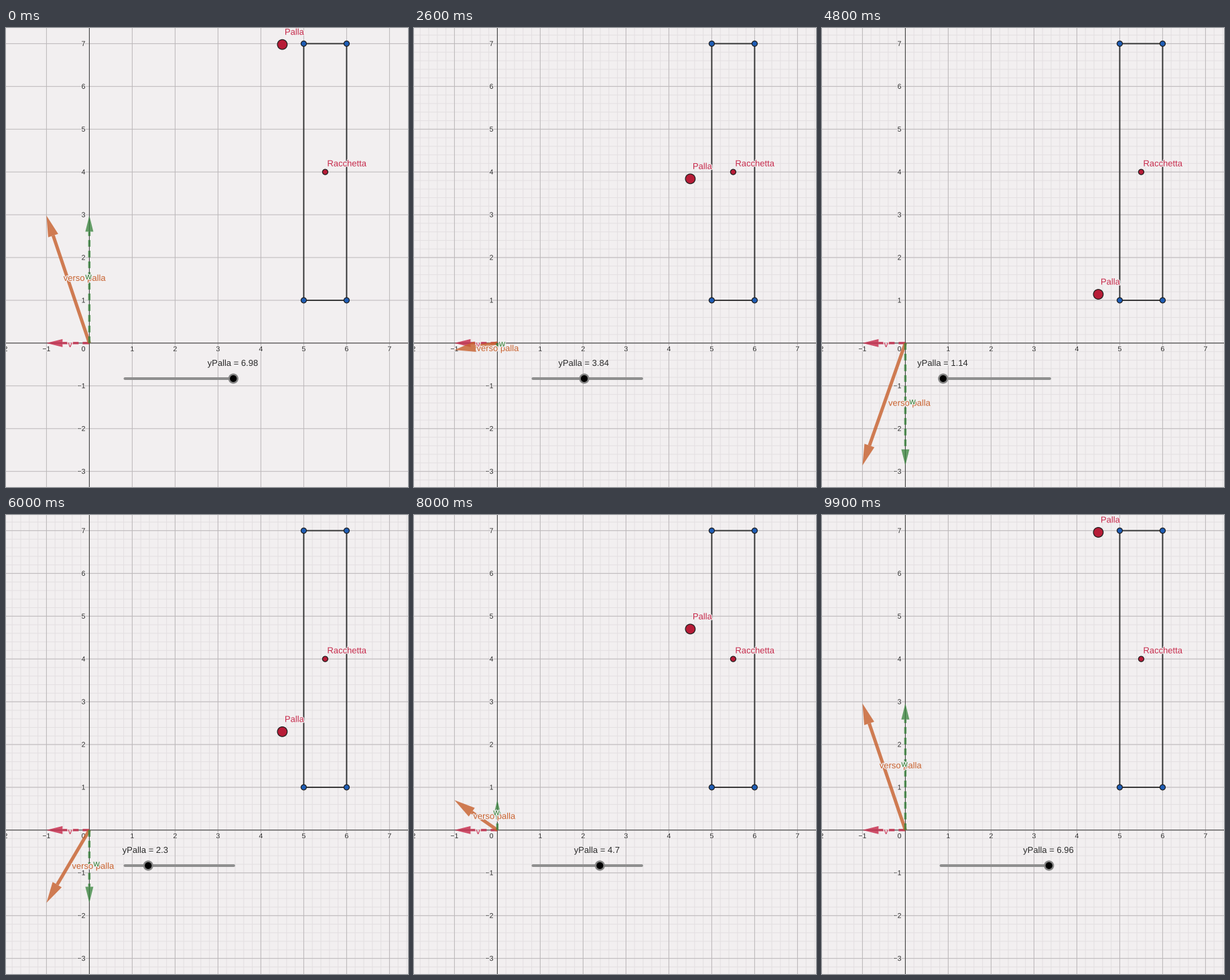
A matplotlib script that plays this animation: 600 by 686 pixels, repeating every 10000 ms.

```python
import numpy as np
import matplotlib.pyplot as plt
from matplotlib.animation import FuncAnimation
from matplotlib.patches import Circle, Polygon
from matplotlib.patheffects import withStroke

W, H, DPI = 600, 686, 100
FRAMES, STEP = 100, 100
X0, Y0, UX, UY = 123.9, 470.4, 64, 63.93
BG, INK = "#f2eff0", "#2a2a2a"
RED, GREEN, ORANGE = "#c62a4b", "#348239", "#c8622f"

plt.rcParams["font.family"] = "Liberation Sans"
plt.rcParams["path.snap"] = False


def pt(px):
    return px * 72 / DPI


def sx(x):
    return X0 + x * UX


def sy(y):
    return Y0 - y * UY


# Integer coordinates are pixel centres
fig = plt.figure(figsize=(W / DPI, H / DPI), dpi=DPI, facecolor=BG)
ax = fig.add_axes([0, 0, 1, 1])
ax.set_xlim(-0.5, W - 0.5)
ax.set_ylim(H - 0.5, -0.5)
ax.axis("off")


def line(xs, ys, color, width, z, **kw):
    kw.setdefault("solid_capstyle", "butt")
    return ax.plot(xs, ys, color=color, lw=pt(width), zorder=z, **kw)[0]


def label(x, y, s, color, z=10, size=13, ha="left", halo=2.5):
    fx = [withStroke(linewidth=pt(halo), foreground=BG)]
    return ax.text(x, y, s, color=color, fontsize=pt(size), ha=ha,
                   va="baseline", zorder=z, path_effects=fx)


def dot(x, y, r, color, edge="#1c1c1c", width=1.2, z=8):
    return ax.add_patch(Circle((x, y), r, fc=color, ec=edge,
                               lw=pt(width), zorder=z))


def grid(xs, ys, color, z):
    kw = dict(colors=color, lw=pt(1), zorder=z)
    return [ax.vlines([sx(x) for x in xs], -1, H, **kw),
            ax.hlines([sy(y) for y in ys], -1, W, **kw)]


class Vector:
    """Arrow from the origin with a label beside its middle."""

    def __init__(self, name, color, width, head, gap, z, alpha, dashed=False):
        self.head, self.gap = head, gap
        style = dict(linestyle=(0, (10 / width, 6 / width))) if dashed else {}
        self.shaft = line([], [], color, width, z, alpha=alpha,
                          dash_capstyle="butt", **style)
        self.tip = ax.add_patch(Polygon([(0, 0)] * 3, fc=color, lw=0,
                                        alpha=alpha, zorder=z))
        self.text = label(0, 0, name, color, z=z + 6)

    def set(self, x, y):
        start, end = np.array([sx(0), sy(0)]), np.array([sx(x), sy(y)])
        size = np.hypot(*(end - start))
        d = (end - start) / max(size, 1e-6)
        side = np.array([d[1], -d[0]])
        head = min(self.head, size)
        base = end - d * head
        self.shaft.set_data([start[0], base[0]], [start[1], base[1]])
        self.tip.set_xy([end, base + side * head / 4, base - side * head / 4])
        gap = self.gap * min(1, size / 25)
        self.text.set_position((start + end) / 2 + side * gap)


# Grid, axes and numbers
minor = grid(np.arange(-10, 40) / 5, np.arange(-17, 38) / 5, "#e4e0e2", 0)
grid(range(-1, 8), range(-3, 8), "#bcb8ba", 1)
line([X0, X0], [-1, H], "#3a3a3a", 1, 2)
line([-1, W], [Y0, Y0], "#3a3a3a", 1, 2)
for n in range(-3, 8):
    s = str(n).replace("-", "\u2212")
    if n >= -2:
        label(sx(n) if n else 115, 482.6, s, INK, 3, 10.5, "center", 2)
    if n:
        label(118, sy(n) + 3.5, s, INK, 3, 10.5, "right", 2)

# Racket
left, right, top, bottom = sx(5), sx(6), sy(7), sy(1)
line([left, right, right, left, left], [top, top, bottom, bottom, top],
     "#333333", 1.9, 4)
for x in (left, right):
    for y in (top, bottom):
        dot(x, y, 4, "#1f5db5")
dot(sx(5.5), sy(4), 4, "#b71c37")
label(sx(5.5) + 3, sy(4) - 8.5, "Racchetta", RED)

# Vectors
v = Vector("v", RED, 3.5, 24, 6, 5, 0.82, True)
w = Vector("w", GREEN, 3.5, 24, 6, 5.2, 0.75, True)
to_ball = Vector("verso palla", ORANGE, 5, 31.5, 7, 5.1, 0.82)
v.set(-1, 0)

# Ball and slider
ball = dot(sx(4.5), 0, 7.3, "#b71c37")
ball_name = label(sx(4.5) + 3.5, 0, "Palla", RED)
line([177, 339.5], [523.5, 523.5], "#8f8f8f", 4, 6, solid_capstyle="round")
ring = dot(0, 523.5, 7.6, "#858585", "none", 0)
knob = dot(0, 523.5, 5.1, "black", "none", 0, 9)
value = label(0, 504.5, "", INK)

# Ball height over time, in seconds
TIMES = [0, 1.4, 3.7, 4.8, 4.92, 7.2, 8.8, 9.9]
HEIGHTS = [6.98, 5.3, 2.52, 1.14, 1, 3.74, 5.68, 6.96]


def update(i):
    t = i * STEP / 1000
    y = round(np.interp(t, TIMES, HEIGHTS) / 0.02) * 0.02
    for g in minor:
        g.set_alpha(min(1, t / 1.1))
    ball.center = (sx(4.5), sy(y))
    ball_name.set_y(sy(y) - 14.5)
    w.set(0, y - 4)
    to_ball.set(-1, y - 4)
    kx = 176.5 + (y - 1) * 27.14
    ring.center = knob.center = (kx, 523.5)
    value.set_x(kx - 38.6)
    value.set_text(f"yPalla = {round(y, 2):g}")
    return []


anim = FuncAnimation(fig, update, frames=FRAMES, interval=STEP,
                     repeat=True, repeat_delay=0)
plt.show()
```
